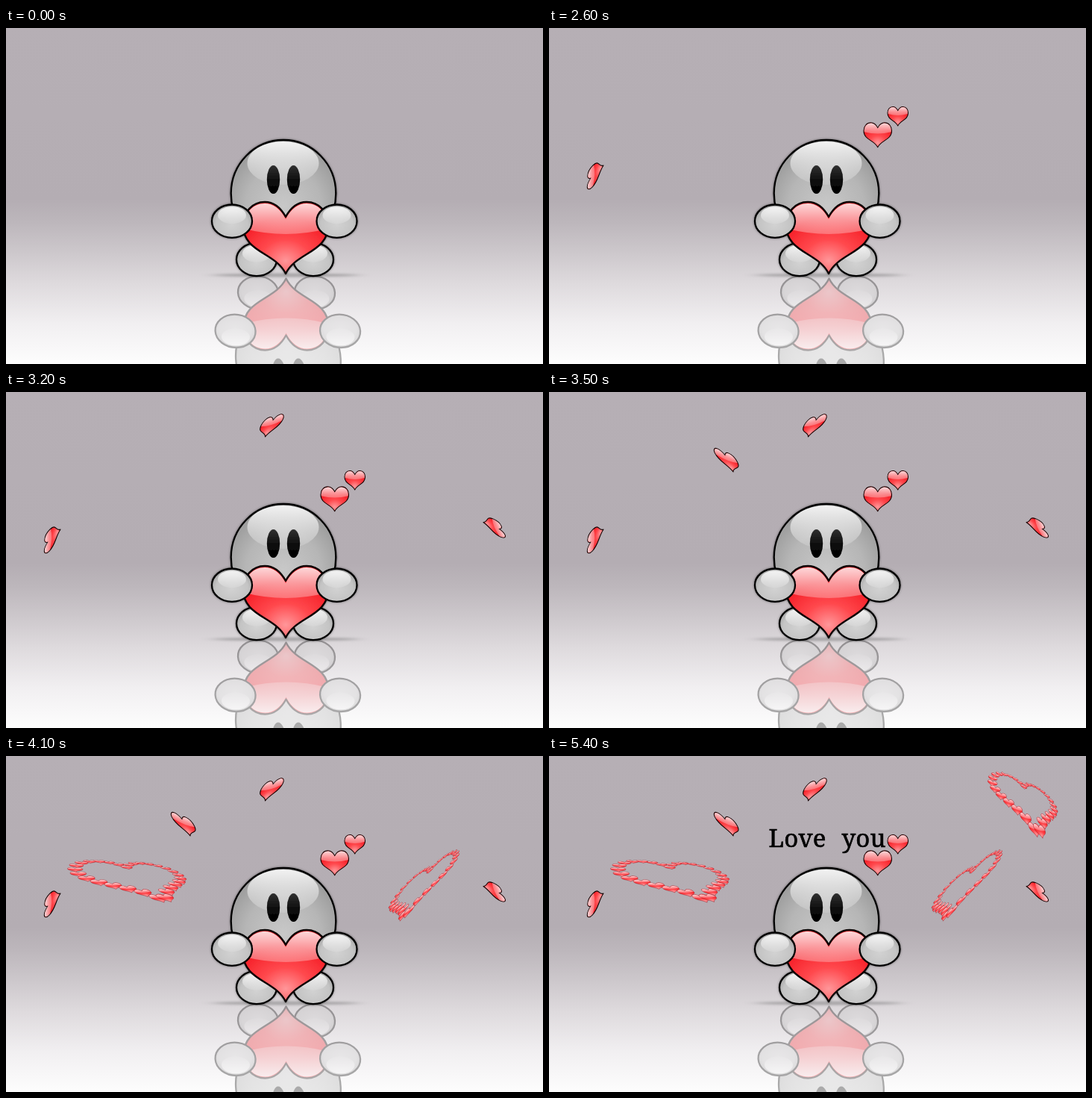
Write an HTML page that moves like this. It is 720 px wide and 450 px high and loops after 8400 ms.

```html
<!DOCTYPE html>
<html lang="en">
<head>
<meta charset="utf-8">
<title>Love you</title>
<style>
html, body { margin: 0; width: 100%; height: 100%; overflow: hidden; background: #b5aeb4; }
svg { display: block; width: 720px; height: 450px; }
text { font: 500 33px "Noto Serif", "Liberation Serif", serif; word-spacing: 12px; letter-spacing: .2px; }
#outline { vector-effect: non-scaling-stroke; }
</style>
</head>
<body>
<svg id="stage" viewBox="0 0 720 450">
  <defs>
    <linearGradient id="floor" x2="0" y2="1">
      <stop offset="0" stop-color="#b6afb5"/>
      <stop offset=".51" stop-color="#b4adb3"/>
      <stop offset=".58" stop-color="#bdb7bc"/>
      <stop offset=".67" stop-color="#cdc8cc"/>
      <stop offset=".76" stop-color="#dedadd"/>
      <stop offset=".88" stop-color="#f1eff1"/>
      <stop offset="1" stop-color="#fdfdfd"/>
    </linearGradient>
    <radialGradient id="skin" cy=".62" r=".6">
      <stop offset="0" stop-color="#c8c8c8"/>
      <stop offset=".6" stop-color="#b6b6b6"/>
      <stop offset="1" stop-color="#9a9a9a"/>
    </radialGradient>
    <radialGradient id="limb" cy=".6" r=".58">
      <stop offset="0" stop-color="#d2d2d2"/>
      <stop offset=".7" stop-color="#c4c4c4"/>
      <stop offset="1" stop-color="#a4a4a4"/>
    </radialGradient>
    <linearGradient id="shine" x2="0" y2="1">
      <stop offset="0" stop-color="#fff" stop-opacity=".88"/>
      <stop offset="1" stop-color="#fff" stop-opacity=".12"/>
    </linearGradient>
    <linearGradient id="gloss" x2="0" y2="1">
      <stop offset="0" stop-color="#fff" stop-opacity=".82"/>
      <stop offset="1" stop-color="#fff" stop-opacity=".28"/>
    </linearGradient>
    <radialGradient id="red" cy=".82" r=".6">
      <stop offset="0" stop-color="#ff9699"/>
      <stop offset=".5" stop-color="#ff484d"/>
      <stop offset="1" stop-color="#f6222a"/>
    </radialGradient>
    <linearGradient id="eye" x2="0" y2="1">
      <stop offset="0" stop-color="#303030"/>
      <stop offset=".6" stop-color="#0a0a0a"/>
      <stop offset="1" stop-color="#000"/>
    </linearGradient>
    <filter id="glow" x="-10%" y="-10%" width="120%" height="120%">
      <feDropShadow dx="0" dy="0" stdDeviation="1.6" flood-opacity=".5"/>
    </filter>
    <filter id="soft" x="-30%" y="-200%" width="160%" height="500%">
      <feGaussianBlur stdDeviation="10 1.8"/>
    </filter>

    <!-- notch at 0,0; sides at ±57,11; tip at 0,76 -->
    <g id="heart">
      <path id="outline" fill="url(#red)" stroke-linejoin="round" d="M0 0C-7-13-17-20-28-20C-45-20-57-6-57 11C-57 48-14 47 0 76C14 47 57 48 57 11C57-6 45-20 28-20C17-20 7-13 0 0Z"/>
      <path fill="url(#gloss)" stroke="none" d="M-55 16Q0 30 55 16C57-4 45-18 28-18C17-18 7-11 0 3C-7-11-17-18-28-18C-45-18-57-4-55 16Z"/>
    </g>
    <g id="paw">
      <ellipse rx="27" ry="22.2" fill="url(#limb)" stroke="#000" stroke-width="2.3"/>
      <ellipse cy="-8" rx="19" ry="11.5" fill="url(#shine)"/>
    </g>
    <g id="body">
      <use href="#paw" x="336" y="310"/>
      <use href="#paw" x="412" y="310"/>
      <ellipse cx="372" cy="221.5" rx="70.3" ry="71.5" fill="url(#skin)" stroke="#000" stroke-width="2.3"/>
      <ellipse cx="371.5" cy="181" rx="48" ry="29" fill="url(#shine)"/>
      <ellipse cx="358.500" cy="203" rx="8.700" ry="19" fill="url(#eye)"/>
      <ellipse cx="385.5" cy="203" rx="8.7" ry="19" fill="url(#eye)"/>
    </g>
    <g id="arms">
      <use href="#paw" x="303" y="258.700"/>
      <use href="#paw" x="443.5" y="258.7"/>
    </g>
    <use id="bigHeart" href="#heart" x="375" y="253" stroke="#0a0000" stroke-width="2.4"/>
  </defs>

  <rect width="720" height="450" fill="url(#floor)"/>
  <g opacity=".32">
    <use href="#body" transform="matrix(1 0 -.05 -1 17.5 664.5)"/>
    <use href="#bigHeart" transform="matrix(1 0 0 -1 .5 664.5)"/>
    <use href="#arms" transform="matrix(1 0 -.05 -1 17.5 664.5)"/>
  </g>
  <ellipse cx="375" cy="331" rx="98" ry="2.5" fill="#777" opacity=".5" filter="url(#soft)"/>
  <g filter="url(#glow)">
    <use href="#body"/>
    <use href="#bigHeart"/>
    <use href="#arms"/>
  </g>
</svg>
<script>
const LOOP = 8400, FIRST = 2000, STEP = 300, TEXT_AT = 5400;
const HALF = 57, SIDE_Y = 11, TIP_Y = 76, MID_Y = 26;
const CORNERS = [[-HALF, SIDE_Y], [HALF, SIDE_Y], [0, TIP_Y]];
const stage = document.getElementById("stage");
const outline = document.getElementById("outline");
const parts = [];

function add(parent, tag, attrs) {
  const el = document.createElementNS("http://www.w3.org/2000/svg", tag);
  for (const key in attrs) el.setAttribute(key, attrs[key]);
  return parent.appendChild(el);
}

// parts pop in one after another
function part(start = FIRST + STEP * parts.length) {
  const el = add(stage, "g", { visibility: "hidden" });
  parts.push({ start, el });
  return el;
}

// places a heart by its left side, right side and tip
function heart(parent, [left, right, tip], width = 1.1, stroke = "#140000") {
  const mid = left.map((v, i) => (v + right[i]) / 2);
  const a = left.map((v, i) => (right[i] - v) / (2 * HALF));
  const b = mid.map((v, i) => (tip[i] - v) / (TIP_Y - SIDE_Y));
  const notch = mid.map((v, i) => v - SIDE_Y * b[i]);
  add(parent, "use", {
    href: "#heart", transform: `matrix(${[...a, ...b, ...notch]})`, "stroke-width": width, stroke
  });
}

// perspective map of the heart's plane; a larger weight is farther away
function plane(corners, weights) {
  return ([x, y]) => {
    const t = (y - SIDE_Y) / (TIP_Y - SIDE_Y);
    const share = [(1 - t) / 2 - x / (2 * HALF), (1 - t) / 2 + x / (2 * HALF), t]
      .map((s, i) => s * weights[i]);
    const sum = share[0] + share[1] + share[2];
    return [0, 1].map(i => corners.reduce((acc, c, k) => acc + c[i] * share[k], 0) / sum);
  };
}

// small hearts along the outline of a large tilted one
function ring(corners, weights, count = 29, size = 0.12) {
  const g = part();
  const project = plane(corners, weights);
  const length = outline.getTotalLength();
  for (let i = 0; i < count; i++) {
    const p = outline.getPointAtLength(length * i / count);
    heart(g, CORNERS.map(([x, y]) => project([p.x + size * x, p.y + size * (y - MID_Y)])), 0.4, "#90101a");
  }
}

heart(part(), [[422, 137.5], [459.5, 137.5], [440.7, 159.8]]);
heart(part(), [[454, 113.7], [481.5, 113.7], [467.7, 131]]);
heart(part(), [[59, 184], [58, 213], [73, 184]]);
heart(part(), [[342, 45], [371, 37], [347.5, 60]]);
heart(part(), [[663, 194], [653, 170], [640, 174.5]]);
heart(part(), [[222.6, 82], [252.6, 94], [247, 107]]);

ring([[93, 152], [225, 155], [216, 195]], [1, 1.3, 0.75]);
ring([[526, 185], [603, 135], [532, 218]], [1, 1, 0.65]);
ring([[595, 30], [673, 60], [658, 108]], [1, 1.25, 0.6]);

add(part(TEXT_AT), "text", { x: 294.5, y: 121.5, stroke: "#000", "stroke-width": 0.6 }).textContent = "Love you";

const origin = performance.now();
function draw() {
  const t = (performance.now() - origin) % LOOP;
  for (const { start, el } of parts) el.setAttribute("visibility", t >= start ? "visible" : "hidden");
  requestAnimationFrame(draw);
}
draw();
</script>
</body>
</html>
```
